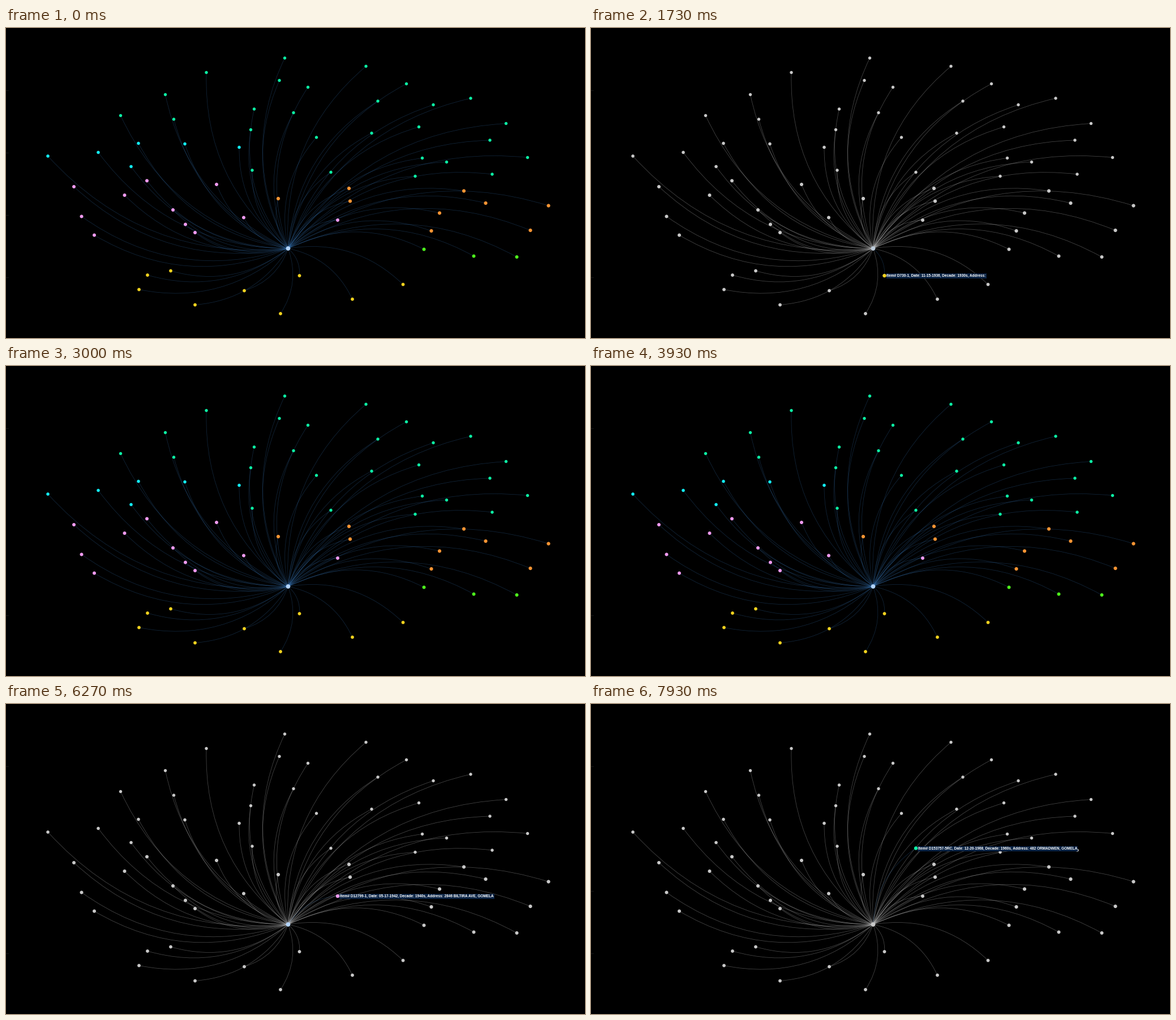
A matplotlib script that plays this animation: 1023 by 547 pixels, repeating every 8000 ms.

```python
import matplotlib.pyplot as plt
from matplotlib.animation import FuncAnimation
from matplotlib.collections import PatchCollection, PathCollection
from matplotlib.patches import Circle
from matplotlib.path import Path

W, H, DPI = 1023, 547, 64
PX = 72 / DPI
LOOP, STEP = 8000, 50

HUB = (498.5, 389)
GREY = "#c8c8c8"
EDGE = (0.27, 0.58, 0.90, 0.25)
EDGE_DIM = (0.85, 0.85, 0.85, 0.32)

# colour, radius, positions
GROUPS = [
    ("#0cf2a4", 2.7, [
        (492.5, 53), (354, 78.5), (483, 92.5), (533.5, 104.5), (636, 67.5),
        (707.5, 98.5), (281.5, 117.5), (657, 129), (821, 124), (755, 135.5),
        (438.5, 143), (508, 149.5), (202.5, 154.5), (296.5, 161),
        (883.5, 168.5), (729.5, 174.5), (432.5, 179.5), (646, 185.5),
        (548.5, 193), (855, 198), (735.5, 229.5), (921.5, 228.5),
        (778.5, 236.5), (435, 251), (574, 254.5), (859, 258), (723, 261.5)]),
    ("#12ecf4", 2.8, [
        (234, 203.5), (316, 204.5), (412, 210.5), (163, 219.5), (74, 226),
        (221, 244.5)]),
    ("#f09af0", 3.0, [
        (249, 269.5), (372, 276), (120, 280), (209.5, 295), (295, 321),
        (133.5, 332.5), (420, 334.5), (586, 339), (317, 346.5), (334, 361),
        (156, 365.5)]),
    ("#f79433", 3.1, [
        (606, 283), (481, 301), (809, 287.5), (608, 305.5), (847.5, 309),
        (958.5, 313.5), (766, 326.5), (926.5, 357), (751.5, 358)]),
    ("#4df01c", 3.0, [(738.5, 390.5), (826.5, 402.5), (902.5, 404)]),
    ("#f2d21e", 2.9, [
        (291, 428.5), (518.5, 437), (250, 436), (701.5, 452.5),
        (235, 461.5), (421, 463.5), (612, 478.5), (334, 488.5), (485, 504)]),
]
NODES = [(x, y, r, c) for c, r, pts in GROUPS for x, y in pts]

# start, end, node position, hub colour, label
HOVERS = [
    (130, 3000, (518.5, 437), "#bccbda",
     "Item# D730-1, Date: 11-15-1936, Decade: 1930s, Address:"),
    (4000, 6860, (586, 339), "#b3d4fb",
     "Item# D12799-1, Date: 05-17-1942, Decade: 1940s, "
     "Address: 2846 BILTIRA AVE, GOMELA"),
    (7860, LOOP, (574, 254.5), GREY,
     "Item# D153757-5RC, Date: 12-20-1968, Decade: 1960s, "
     "Address: 482 ORMADWEN, GOMELA"),
]


def curve(x, y):
    """Quadratic arc from the hub, bowed by a quarter of its length."""
    hx, hy = HUB
    ctrl = ((hx + x) / 2 + (y - hy) / 4, (hy + y) / 2 + (hx - x) / 4)
    return Path([HUB, ctrl, (x, y)], [Path.MOVETO, Path.CURVE3, Path.CURVE3])


def ticks_at(t):
    if t < 100:
        return (110, 220, 330, 440)
    if t < 1400:
        return ()
    return (110, 330, 440) if t >= 7800 else (110, 440)


fig = plt.figure(figsize=(W / DPI, H / DPI), dpi=DPI, facecolor="black")
ax = fig.add_axes([0, 0, 1, 1])
ax.set_xlim(0, W)
ax.set_ylim(H, 0)
ax.axis("off")

edges = PathCollection([curve(x, y) for x, y, _, _ in NODES],
                       facecolors="none", linewidths=0.8 * PX, zorder=1)
dots = PatchCollection([Circle((x, y), r) for x, y, r, _ in NODES],
                       linewidths=0, zorder=2)
ax.add_collection(edges)
ax.add_collection(dots)
hub = ax.add_patch(Circle(HUB, 3.8, lw=0, zorder=3))
label = ax.text(0, 0, "", color="white", family="Liberation Sans",
                weight="bold", size=6.52 * PX, va="baseline", zorder=4,
                bbox=dict(boxstyle="square,pad=0.14", fc="#0a2344", ec="none"))
focus = ax.add_patch(Circle((0, 0), 3.2, lw=0, zorder=5))
ticks = {y: ax.plot([0, 4], [y, y], color="#151515", lw=PX)[0]
         for y in (110, 220, 330, 440)}


def draw(i):
    t = i * STEP
    hover = next((h for h in HOVERS if h[0] <= t < h[1]), None)
    label.set_visible(hover is not None)
    focus.set_visible(hover is not None)
    if hover:
        _, _, pos, hub_color, text = hover
        edges.set_edgecolor([EDGE if (x, y) == pos else EDGE_DIM
                             for x, y, _, _ in NODES])
        dots.set_facecolor(GREY)
        hub.set_facecolor(hub_color)
        label.set_text(text)
        label.set_position((pos[0] + 4, pos[1] + 2.2))
        focus.center = pos
        focus.set_facecolor(next(c for x, y, _, c in NODES if (x, y) == pos))
    else:
        edges.set_edgecolor(EDGE)
        dots.set_facecolor([c for *_, c in NODES])
        hub.set_facecolor("#b3d4fb")
    shown = ticks_at(t)
    for y, line in ticks.items():
        line.set_visible(y in shown)
    return edges, dots, hub, label, focus, *ticks.values()


anim = FuncAnimation(fig, draw, frames=LOOP // STEP, interval=STEP,
                     init_func=lambda: draw(0), repeat=True, repeat_delay=0,
                     blit=False)
plt.show()
```
